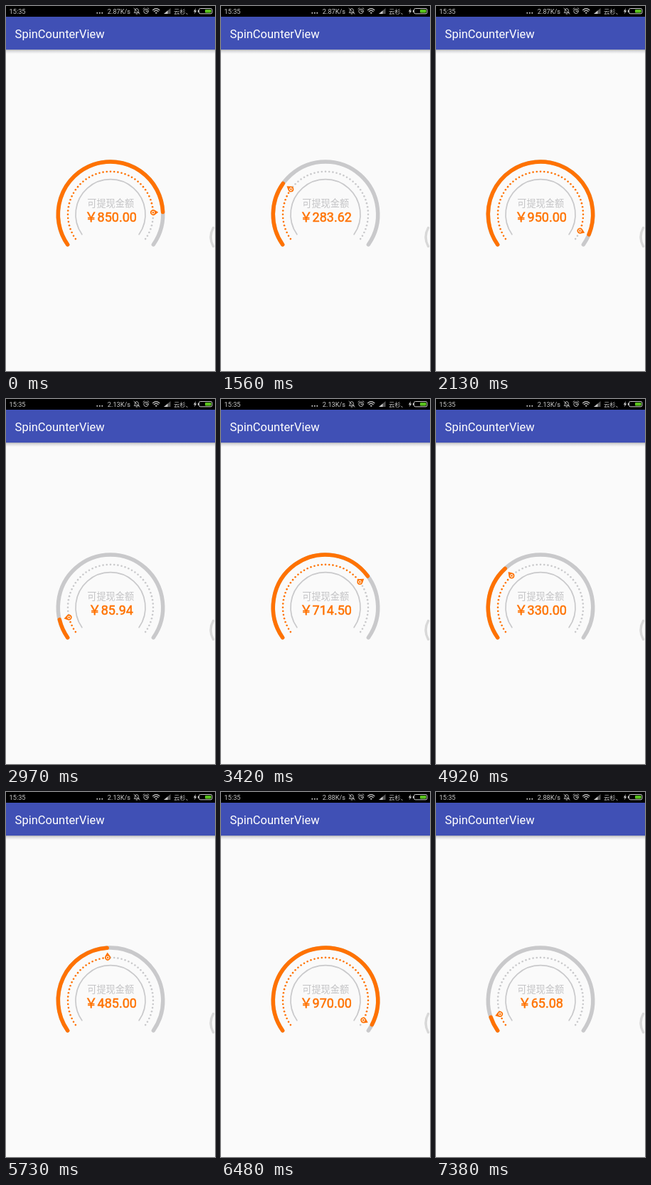
These frames come from a looping animation (294x511 px, 7410 ms). An HTML page:

```html
<!DOCTYPE html>
<html lang="zh">
<head>
<meta charset="utf-8">
<title>SpinCounterView</title>
<style>
  html, body { margin: 0; width: 100%; height: 100%; overflow: hidden; background: #fafafa; }
  svg { display: block; width: 294px; height: 511px; }
  text { font-family: Roboto, "Noto Sans CJK SC", "Noto Sans CJK", sans-serif; }
  .status text { font-size: 9.2px; fill: #c8c8c8; }
  .line { fill: none; stroke-linecap: round; }
</style>
</head>
<body>
<svg viewBox="0 0 294 511" xmlns="http://www.w3.org/2000/svg">
  <defs>
    <linearGradient id="shade" x2="0" y2="1">
      <stop offset="0" stop-color="#b4b4b8"/>
      <stop offset=".4" stop-color="#dedee0"/>
      <stop offset="1" stop-color="#fafafa"/>
    </linearGradient>
  </defs>
  <rect width="294" height="511" fill="#fafafa"/>
  <rect y="61" width="294" height="6" fill="url(#shade)"/>
  <rect y="15" width="294" height="46" fill="#4050b5"/>
  <text x="12.6" y="44.5" font-size="16.5" fill="#fff">SpinCounterView</text>

  <g class="status">
    <rect width="294" height="15" fill="#000"/>
    <text x="4.6" y="11">15:35</text>
    <g fill="#c8c8c8">
      <circle cx="128.3" cy="9.7" r="1"/><circle cx="131.8" cy="9.7" r="1"/><circle cx="135.3" cy="9.7" r="1"/>
    </g>
    <text id="speed" x="142.8" y="11">2.87K/s</text>
    <g class="line" stroke="#c8c8c8" stroke-width=".9">
      <path d="M180.5 9.3h6.8c-1-1-1-2-1-3.2a2.4 2.4 0 0 0-4.8 0c0 1.200 0 2.200-1 3.200M183 11h1.800M180 3.300l8 7.800"/>
      <circle cx="197" cy="7.300" r="3.200"/>
      <path d="M197 5.500v2h1.400M193 4.200l1.700-1.400M201 4.200l-1.700-1.400"/>
      <path d="M206.500 5.700q4.700-4 9.400 0M208.200 7.700q3-2.500 6 0" stroke-width="1.200"/>
    </g>
    <path d="M209.500 9.300q1.700-1.300 3.400 0l-1.700 1.800z" fill="#c8c8c8"/>
    <path d="M222 11l9.500-8v8z" fill="#555"/>
    <path d="M222 11l5.500-4.600V11z" fill="#c8c8c8"/>
    <text x="236" y="10.600" style="font-size:8.400px">云杉、</text>
    <path d="M267 3l-3.200 4.700h2l-1 3.500 3.400-4.800h-2z" fill="#d8d8d8"/>
    <rect x="271.500" y="3.500" width="18.500" height="7.300" rx="2" fill="none" stroke="#c8c8c8"/>
    <rect x="269.800" y="5.800" width="1.200" height="2.800" fill="#c8c8c8"/>
    <rect x="280" y="5" width="8.700" height="4.400" rx=".8" fill="#58c21c"/>
  </g>

  <path class="line" d="M291.500 310.500q-7 13 0 26" stroke="#d8d8d8" stroke-width="3.400"/>

  <g id="gauge">
    <path id="track" class="line" stroke="#c9c9cb" stroke-width="5.500"/>
    <path id="inner" class="line" stroke="#c9c9cb" stroke-width="1.700"/>
    <path id="bar" class="line" stroke="#ff7200" stroke-width="5.500"/>
    <g id="dots"></g>
    <g id="pin">
      <path d="M2.200-3.400L7.300 0 2.200 3.400A4 4 0 1 1 2.200-3.400z" fill="#ff7200"/>
      <circle r="2.300" fill="#fafafa"/>
      <circle r="1.300" fill="#ff7200"/>
    </g>
    <text x="147.200" y="281.300" font-size="13.200" text-anchor="middle" fill="#c3c3c5">可提现金额</text>
    <text id="amount" x="147.300" y="302" font-size="18" text-anchor="middle" fill="#ff7200" stroke="#ff7200" stroke-width=".5"></text>
  </g>
</svg>
<script>
const LOOP = 7410, TICK = 30, SPIN = 900;
const CX = 147, CY = 291.7, START = 145, SWEEP = 250, MAX = 1000;
const R_BAR = 73.7, R_DOTS = 60, R_INNER = 49, GAPS = 50;

// reset time, start of the spin, amount reached
const runs = [
  [-SPIN, -SPIN, 850],
  [1170, 1228.8, 950],
  [2790, 2790, 900],
  [4020, 4020.6, 330],
  [5280, 5280, 970],
  [7020, 7021.8, 190],
];
const speeds = [[0, '2.87'], [2460, '2.13'], [6480, '2.88']];

const $ = id => document.getElementById(id);
const latest = (steps, t) => steps.filter(s => s[0] <= t).pop();
const clamp = x => Math.min(1, Math.max(0, x));
const ease = x => (1 - Math.cos(Math.PI * x)) / 2;

function point(r, deg) {
  const a = deg * Math.PI / 180;
  return [CX + r * Math.cos(a), CY + r * Math.sin(a)];
}

function arc(r, sweep) {
  if (sweep <= 0) return '';
  return `M${point(r, START)}A${r} ${r} 0 ${sweep > 180 ? 1 : 0} 1 ${point(r, START + sweep)}`;
}

$('track').setAttribute('d', arc(R_BAR, SWEEP));
$('inner').setAttribute('d', arc(R_INNER, SWEEP));

const dots = Array.from({ length: GAPS + 1 }, (_, i) => {
  const dot = document.createElementNS('http://www.w3.org/2000/svg', 'circle');
  const [x, y] = point(R_DOTS, START + i * SWEEP / GAPS);
  dot.setAttribute('cx', x);
  dot.setAttribute('cy', y);
  dot.setAttribute('r', 1.3);
  $('dots').append(dot);
  return dot;
});

function draw(time) {
  const t = Math.floor(time % LOOP / TICK) * TICK;
  const [, begin, goal] = latest(runs, t);
  const value = goal * ease(clamp((t - begin) / SPIN));
  const part = value / MAX, sweep = SWEEP * part;

  $('bar').setAttribute('d', arc(R_BAR, sweep));
  $('pin').setAttribute('transform',
    `translate(${point(R_DOTS, START + sweep)}) rotate(${START + sweep})`);
  dots.forEach((dot, i) => dot.setAttribute('fill', i <= part * GAPS ? '#ff7200' : '#c9c9cb'));
  $('amount').textContent = '￥' + value.toFixed(2);
  $('speed').textContent = latest(speeds, t)[1] + 'K/s';
}

const origin = performance.now();
function loop() {
  draw(performance.now() - origin);
  requestAnimationFrame(loop);
}
loop();
</script>
</body>
</html>
```
